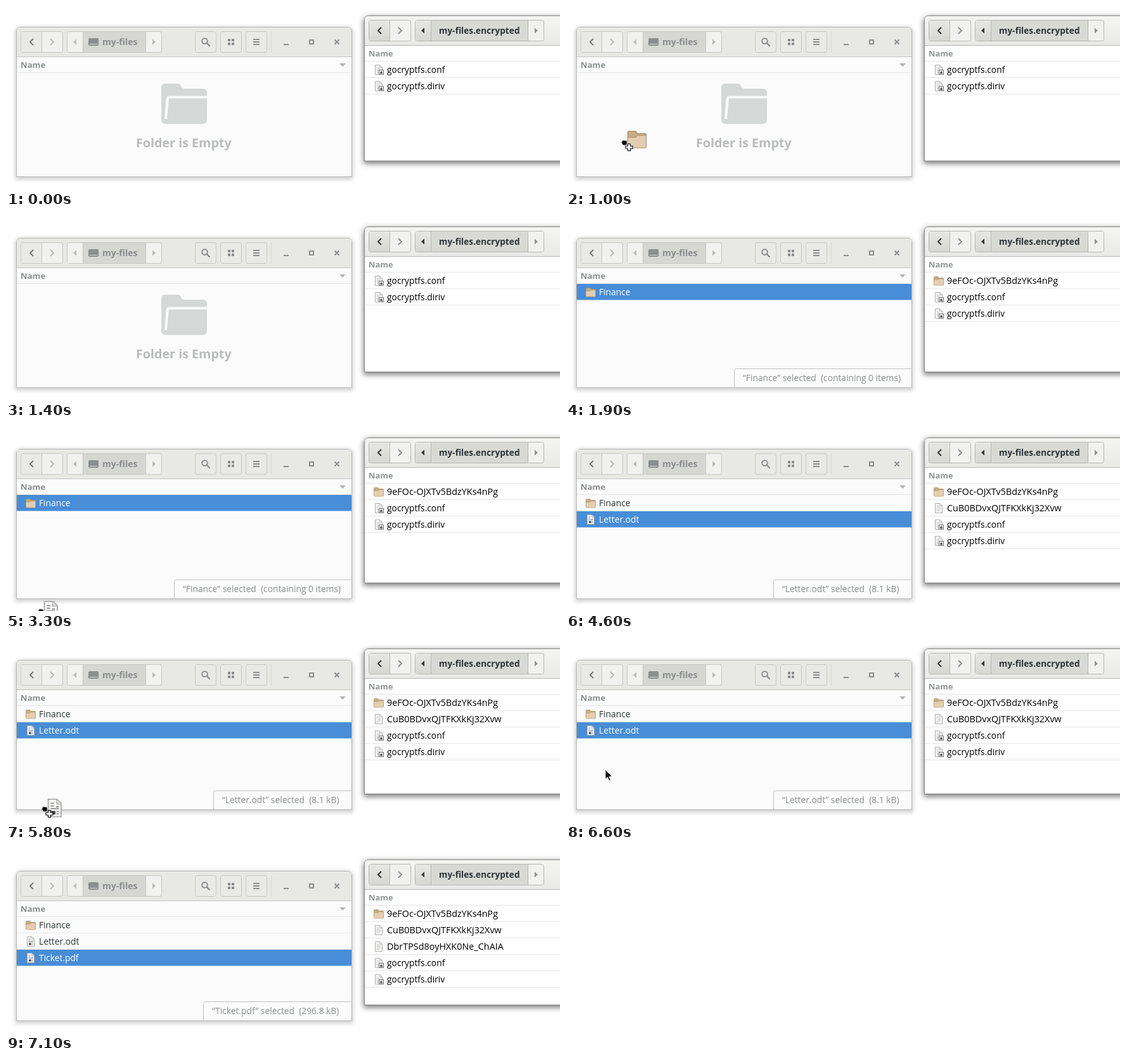
Animation of 874 by 290 pixels, one loop 8000 ms. Source, as an HTML page:

```html
<!DOCTYPE html>
<html lang="en">
<head>
<meta charset="utf-8">
<title>Encrypted folder</title>
<style>
html, body { margin: 0; width: 874px; height: 290px; overflow: hidden; background: #fff; }
body { position: relative; }
.win { position: absolute; box-sizing: border-box; border: 1px solid; border-radius: 7px 7px 0 0; }
.back { left: 16px; top: 33px; width: 530px; height: 238px; background: #fbfbfb;
  border-color: #b4b5b2; box-shadow: 0 2px 6px 2px rgba(0,0,0,.18); }
.front { left: 565px; top: 15px; width: 530px; height: 231px; background: #fff;
  border-color: #858683; box-shadow: 0 3px 9px 1px rgba(0,0,0,.5); }
svg { position: absolute; left: 0; top: 0; }
text { font: 13.8px "Open Sans", "Noto Sans", sans-serif; white-space: pre; }
.b { font-weight: 700; }
</style>
</head>
<body>
<div class="win back"></div>
<div class="win front"></div>
<svg id="stage" width="874" height="290" viewBox="0 0 874 290">
  <defs>
    <linearGradient id="bar" x2="0" y2="1"><stop stop-color="#f4f4f3"/><stop offset="1" stop-color="#e9e9e7"/></linearGradient>
    <linearGradient id="btn" x2="0" y2="1"><stop stop-color="#e6e6e4"/><stop offset="1" stop-color="#d6d6d3"/></linearGradient>
    <g id="folder">
      <path d="M.5 14V2.5q0-1 1-1H7l1.3 2h6.2q1 0 1 1V14z" fill="#c5ab86" stroke="#aa9069" stroke-width=".7"/>
      <path d="M.5 14.5V6.5H7L8.3 5h7.2v9.5q0 .7-.8.7H1.3q-.8 0-.8-.7z" fill="#e4ceb2" stroke="#b59b76" stroke-width=".7"/>
    </g>
    <g id="page">
      <path d="M2.5.5h7.5l3.5 3.5v11.5h-11z" fill="#fafafa" stroke="#a9aaa8"/>
      <path d="M9.5.5v4h4" fill="#ddd" stroke="#b5b6b4" stroke-width=".7"/>
    </g>
    <g id="plain">
      <use href="#page"/>
      <path d="M4.5 4.5h4M4.5 6.5h7M4.5 8.5h7M4.5 10.5h7M4.5 12.5h5" stroke="#c3c4c2" stroke-width=".9"/>
    </g>
    <g id="locked">
      <use href="#plain"/>
      <rect x="8.5" y="8.5" width="7" height="7" fill="#eee" stroke="#747672"/>
      <path d="M10.5 12h3v2h-3zM11 12v-1h2v1" fill="#666" stroke="#666" stroke-width=".8"/>
    </g>
    <g id="doc">
      <use href="#page"/>
      <path d="M4.5 4h3M4.5 6.3h3M9 7h2.5M4.5 8.6h7" stroke="#8a8b89"/>
      <path d="M5 10.5h3.6v3H5z" fill="#444"/>
      <path d="M9.5 11h2M9.5 13h2" stroke="#8a8b89"/>
    </g>
    <g id="grab">
      <path d="M.5 5.5V4.2h1.2V2.4q.9-1.2 1.8 0 .9-1.4 2 0 1-1 1.8.2 1.4-.4 1.7.8v4.2L8 9.5H3z" stroke="#fff" stroke-width=".5"/>
      <path d="M10.5 7.5h4v3.5h3.5v4h-3.5v3.5h-4V15H7v-4h3.5z" fill="#fff" stroke="#000" stroke-width="1.1"/>
    </g>
    <path id="arrow" d="M0 0v15.2l3.5-3.2 2.6 5.8 2.5-1.1L6 11.1h4.9z" fill="#111" stroke="#fff"/>
  </defs>
  <g id="chrome"></g>
  <g id="files"></g>
  <g id="pointer"></g>
</svg>
<script>
const LOOP = 8000;
const $ = id => document.getElementById(id);

const rect = (x, y, w, h, fill, extra = '') =>
  `<rect x="${x}" y="${y}" width="${w}" height="${h}" fill="${fill}" ${extra}/>`;
const line = (d, stroke, w = 1) =>
  `<path d="${d}" fill="none" stroke="${stroke}" stroke-width="${w}"/>`;
const fill = (d, color) => `<path d="${d}" fill="${color}"/>`;
const text = (x, y, s, color, size = 13.8, cls = '') =>
  `<text x="${x}" y="${y}" class="${cls}" fill="${color}" style="font-size:${size}px">${s}</text>`;
const use = (id, x, y, scale = 1) =>
  `<use href="#${id}" transform="translate(${x} ${y}) scale(${scale})"/>`;
const button = (x, y, w, color, border) =>
  rect(x + .5, y + .5, w - 1, 33, color, `rx="3" stroke="${border}"`);

// Back / forward buttons and the path bar, shared by both windows
function navigation(x, y, end, c) {
  const m = y + 17, path = x + 73;
  return button(x, y, 67, c.light, c.border)
    + fill(`M${x + 1} ${y + 3}q0-2 2-2h30v32h-30q-2 0-2-2z`, c.back)
    + line(`M${x + 33.5} ${y + 1}v32`, c.border)
    + line(`M${x + 20} ${m - 5}l-5 5 5 5`, c.ink, 2)
    + line(`M${x + 47} ${m - 5}l5 5-5 5`, c.dim, 2)
    + button(path, y, end - path, c.light, c.border)
    + (c.active ? fill(`M${path + 1} ${y + 3}q0-2 2-2h23v32h-23q-2 0-2-2z`, c.back) : '')
    + rect(path + 25, y + 1, end - path - 50, 32, c.path)
    + line(`M${path + 25.5} ${y + 1}v32M${end - 25.5} ${y + 1}v32`, c.border)
    + fill(`M${path + 15} ${m - 4.5}v9l-5-4.5z`, c.active ? c.ink : c.dim)
    + fill(`M${end - 15} ${m - 4.5}v9l5-4.5z`, c.dim);
}

function chrome() {
  const ink = '#8b8e8f', edge = '#c6c7c4';
  let s = fill('M17 80V40q0-6 6-6h516q6 0 6 6v40z', '#e8e8e4')
    + line('M17 80.5h528', '#c5c6c3')
    + navigation(23, 40, 246, { light: '#f1f1ef', back: '#e9e9e6', path: '#d6d6d3', border: edge, ink: '#777a7a', dim: '#b9bbba' })
    + rect(130, 51, 16, 12, ink, 'rx="2"') + line('M132 60.5h12', '#d6d6d3')
    + text(152, 62, 'my-files', ink, 14, 'b');

  for (const x of [298, 338, 378]) s += button(x, 40, 34, '#e9e9e6', edge);
  s += `<circle cx="313.5" cy="55.5" r="4.3" fill="none" stroke="${ink}" stroke-width="2"/>`
    + line('M316.5 58.5l5 5', ink, 2.4);
  for (const x of [350, 356]) for (const y of [52, 58]) s += rect(x, y, 4, 4, ink);
  s += line('M390 53h10M390 57h10M390 61h10', ink, 2)
    + line('M418.5 40v34', '#d6d7d4')
    + line('M438 61h8', ink, 2)
    + line('M479 54h6v6h-6z', ink, 2)
    + line('M518.5 53.5l7 7M525.5 53.5l-7 7', ink, 2)
    + text(23, 98, 'Name', ink, 13.1, 'b')
    + fill('M526 91h10l-5 5z', '#b2b4b3')
    + line('M17 105.5h528', '#e5e5e4');

  s += fill('M566 62V22q0-6 6-6h302v46z', 'url(#bar)')
    + line('M566 62.5h308', '#b5b6b3')
    + navigation(572, 22, 849, { active: true, light: '#f1f1f0', back: 'url(#btn)', path: '#d8d8d5', border: '#b7b8b5', ink: '#2e3436', dim: '#8f9190' })
    + text(683, 44, 'my-files.encrypted', '#2e3436', 13.7, 'b')
    + text(572, 80, 'Name', '#929595', 12.9, 'b')
    + line('M566 87.5h308', '#e5e5e5');
  return s;
}

const emptyFolder = () =>
  fill('M245 129q0-6 6-6h20q3 0 4 2l3 5q1 1 3 1h30q6 0 6 6v43q0 7-7 7h-58q-7 0-7-7z', '#d6d8d7')
  + line('M317 144.5h-59q-3 0-3.3 3L252 179', '#fbfbfb', 4)
  + text(205, 224, 'Folder is Empty', '#babcbb', 19.7, 'b');

const plainFiles = [['folder', 'Finance'], ['doc', 'Letter.odt'], ['doc', 'Ticket.pdf']];
const cipherFiles = [['folder', '9eFOc-OJXTv5BdzYKs4nPg'], ['plain', 'CuB0BDvxQJTFKXkKj32Xvw'], ['plain', 'DbrTPSd8oyHXK0Ne_ChAIA']];
const configFiles = [['locked', 'gocryptfs.conf'], ['locked', 'gocryptfs.diriv']];
const notes = [
  [265, '“Finance” selected  (containing 0 items)'],
  [327, '“Letter.odt” selected  (8.1 kB)'],
  [311, '“Ticket.pdf” selected  (296.8 kB)']
];

function files(left, note, right) {
  let s = left ? '' : emptyFolder();
  plainFiles.slice(0, left).forEach(([icon, name], i) => {
    const y = 106 + 26 * i, picked = i === left - 1;
    s += picked ? rect(17, y, 528, 25.5, '#478dd7') : line(`M17 ${y + 25.5}h528`, '#e8e8e7');
    s += use(icon, 31, y + 5) + text(52, y + 18, name, picked ? '#fff' : '#2e3436');
  });
  if (note) {
    const [x, label] = notes[note - 1];
    s += `<path d="M${x + .5} 270V243.500q0-3 3-3H545" fill="#fbfbfb" stroke="#bfc0be"/>`
      + text(x + 14, 260, label, '#8b8e8f');
  }
  cipherFiles.slice(0, right).concat(configFiles).forEach(([icon, name], i) => {
    const y = 88 + 26 * i;
    s += line(`M566 ${y + 25.5}h308`, '#e5e5e5') + use(icon, 580, y + 5)
      + text(601, y + 18, name, '#000', icon === 'locked' ? 13.8 : 14.4);
  });
  return s;
}

const sprites = {
  folder: (x, y) => use('folder', x - .5, y - 1.5, 1.93) + use('grab', x - 10, y + 14),
  doc: (x, y) => use('doc', x - 4, y, 1.85) + use('grab', x - 10, y + 11),
  arrow: (x, y) => use('arrow', x, y)
};

// [time, plain rows, status note, cipher rows]
const listSteps = [
  [0, 0, 0, 0], [1700, 1, 0, 0], [1800, 1, 1, 0], [1900, 1, 1, 1],
  [4200, 2, 2, 1], [4300, 2, 2, 2], [6700, 3, 3, 2], [6800, 3, 3, 3]
];
// [time, sprite, x, y]
const pointerSteps = [
  [0],
  [700, 'folder', 84, 272], [800, 'folder', 88, 244], [900, 'folder', 93, 218],
  [1000, 'folder', 97, 197], [1100, 'folder', 97, 181], [1200, 'folder', 97, 170], [1400],
  [3300, 'doc', 60, 274], [3400, 'doc', 62, 250], [3500, 'doc', 65, 228], [3600, 'doc', 67, 211],
  [3800, 'doc', 67, 201], [4000, 'arrow', 63, 205], [4500, 'arrow', 48, 258], [4600],
  [5800, 'doc', 66, 253], [5900, 'doc', 66, 229], [6000, 'doc', 66, 209],
  [6400, 'doc', 63, 191], [6600, 'arrow', 62, 207], [6800, 'arrow', 54, 240],
  [6900, 'arrow', 42, 278], [7100]
];

const at = (steps, t) => steps.findLast(step => step[0] <= t);
let list, pointer;

function draw() {
  const t = performance.now() % LOOP;
  const nextList = at(listSteps, t), nextPointer = at(pointerSteps, t);
  if (nextList !== list) {
    list = nextList;
    $('files').innerHTML = files(...list.slice(1));
  }
  if (nextPointer !== pointer) {
    pointer = nextPointer;
    const [, kind, x, y] = pointer;
    $('pointer').innerHTML = kind ? sprites[kind](x, y) : '';
  }
  requestAnimationFrame(draw);
}

$('chrome').innerHTML = chrome();
draw();
</script>
</body>
</html>
```
